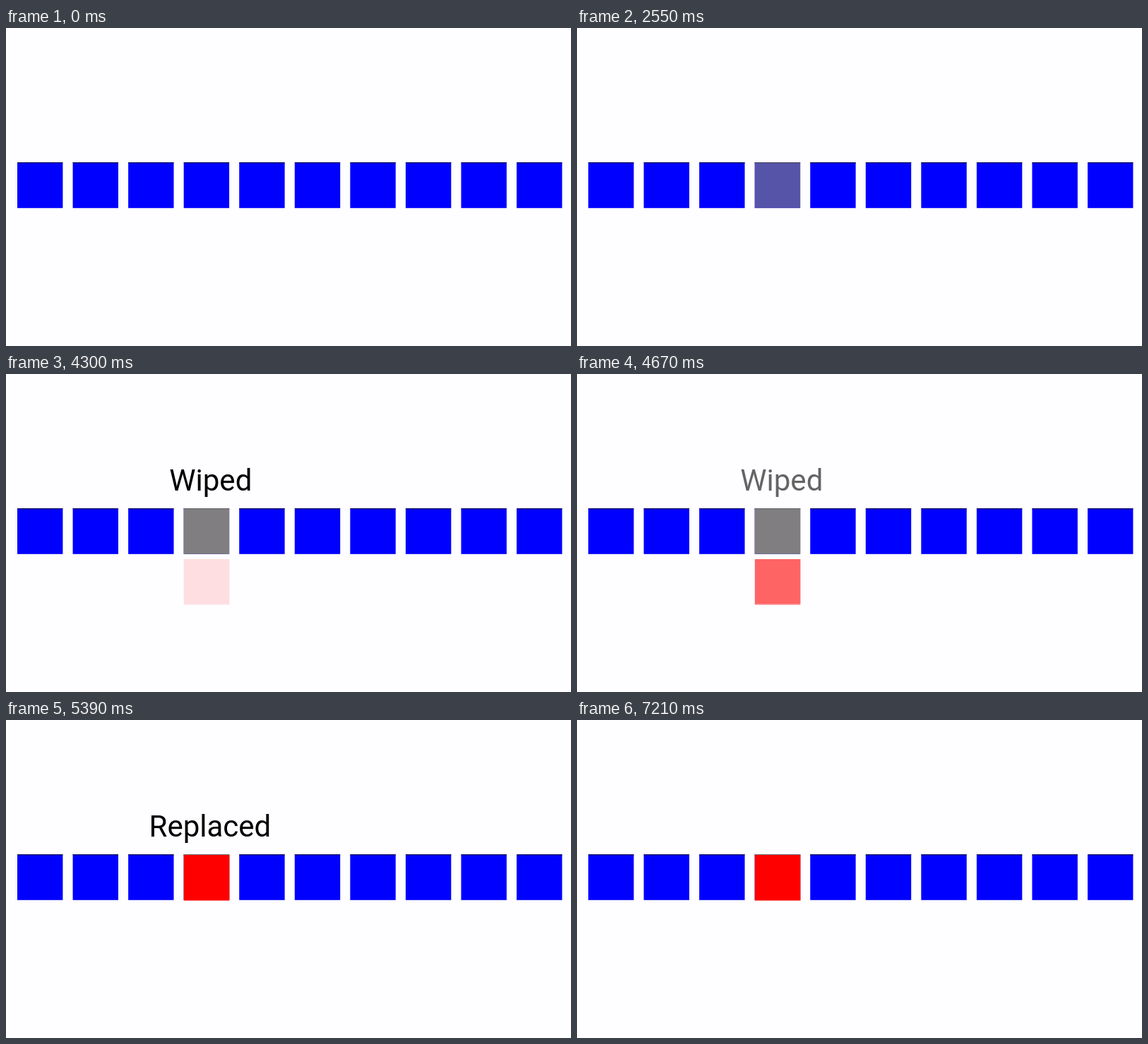
An HTML page for the animation above (7.88 s loop, 800x450 px).

```html
<!DOCTYPE html>
<html lang="en">
<head>
<meta charset="utf-8">
<title>Wiped and replaced</title>
<style>
  html, body { margin: 0; width: 100%; height: 100%; overflow: hidden; background: #fefdff; }
  svg { display: block; width: 100vw; height: 100vh; }
  text { font: 42px Roboto, sans-serif; fill: #000; }

  /* One shared 7880 ms timeline */
  .wipe, .block, .wiped, .replaced {
    opacity: 0;
    animation: 7880ms linear infinite both;
  }
  .wipe { animation-name: wipe; }
  .block { animation-name: block; }
  .wiped { animation-name: wiped; }
  .replaced { animation-name: replaced; }

  @keyframes wipe {
    0%, 30.29% { opacity: 0; }
    33.38%, 100% { opacity: 1; }
  }
  @keyframes block {
    0%, 53.39% { opacity: 0; transform: translateY(70.5px); }
    63.11% { opacity: 1; transform: translateY(70.5px); }
    68.4%, 100% { opacity: 1; transform: translateY(0); }
  }
  @keyframes wiped {
    0%, 41.46% { opacity: 0; }
    43.4%, 56.35% { opacity: 1; }
    63.71%, 100% { opacity: 0; }
  }
  @keyframes replaced {
    0%, 66.5% { opacity: 0; }
    68.4%, 75.38% { opacity: 1; }
    82.99%, 100% { opacity: 0; }
  }
</style>
</head>
<body>
<svg viewBox="0 0 800 450">
  <defs>
    <g id="cell">
      <rect y="190.2" width="64.4" height="64.6" fill="#00f"/>
      <rect y="190.2" width="64.4" height="1.1" fill="#000038"/>
    </g>
  </defs>
  <use href="#cell" x="16"/>
  <use href="#cell" x="94.56"/>
  <use href="#cell" x="173.11"/>
  <use href="#cell" x="251.67"/>
  <use href="#cell" x="330.22"/>
  <use href="#cell" x="408.78"/>
  <use href="#cell" x="487.33"/>
  <use href="#cell" x="565.89"/>
  <use href="#cell" x="644.44"/>
  <use href="#cell" x="723"/>
  <g class="wipe">
    <rect x="251.67" y="190.2" width="64.6" height="64.6" fill="#807e80"/>
    <rect x="251.67" y="190.2" width="64.6" height="1" fill="#6c6a6c"/>
  </g>
  <rect class="block" x="251.8" y="191" width="64.6" height="64.5" fill="#f00"/>
  <text class="wiped" x="231.3" y="164.5">Wiped</text>
  <text class="replaced" x="202.5" y="164.5">Replaced</text>
</svg>
</body>
</html>
```
